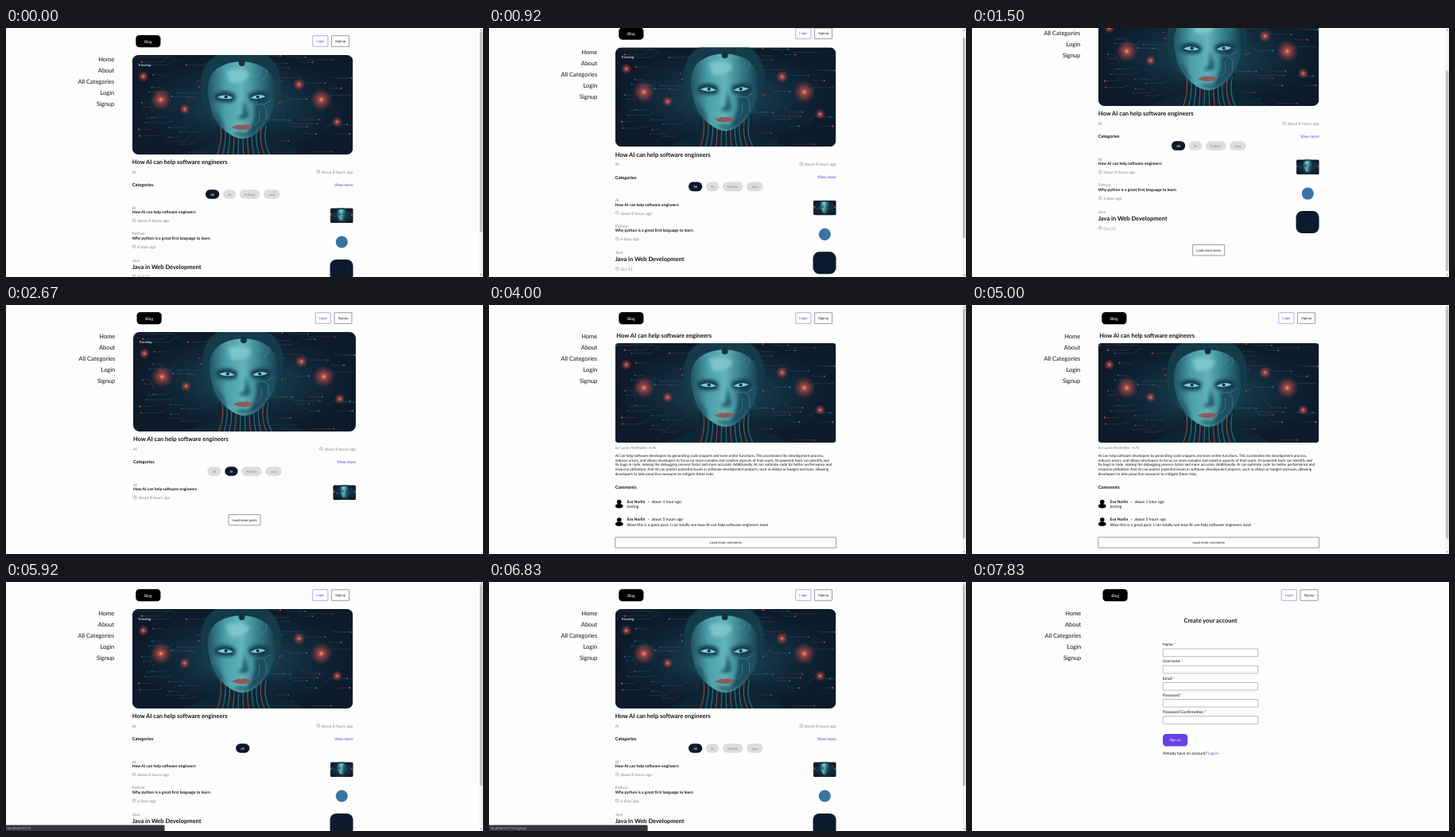
These frames come from a looping animation (600x313 px, 8000 ms). An HTML page:

```html
<!DOCTYPE html>
<html lang="en">
<head>
<meta charset="utf-8">
<title>Blog walkthrough</title>
<style>
  html, body { margin: 0; width: 100%; height: 100%; overflow: hidden; background: #fdfdfd; }
  svg { display: block; width: 100%; height: 100%; }
  text { font-family: Lato, sans-serif; text-rendering: geometricPrecision; white-space: pre; }
  .ui { font-family: "Liberation Sans", Arial, sans-serif; }
  .url { font-family: "Noto Sans", sans-serif; }
</style>
</head>
<body>
<svg viewBox="0 0 600 313">
  <defs>
    <radialGradient id="night"><stop offset="0" stop-color="#1c4c5e"/><stop offset=".55" stop-color="#112b3c"/><stop offset="1" stop-color="#0c1a2a"/></radialGradient>
    <linearGradient id="skin"><stop offset="0" stop-color="#1f5263"/><stop offset=".25" stop-color="#4a9ea8"/><stop offset=".5" stop-color="#62b4ba"/><stop offset=".72" stop-color="#3a8490"/><stop offset="1" stop-color="#173f50"/></linearGradient>
    <radialGradient id="glow"><stop offset="0" stop-color="#ff9a7c"/><stop offset=".25" stop-color="#c9524a" stop-opacity=".75"/><stop offset="1" stop-color="#a03a3a" stop-opacity="0"/></radialGradient>
    <filter id="soft"><feGaussianBlur stdDeviation="2"/></filter>
    <symbol id="art" viewBox="0 0 278 125" preserveAspectRatio="none"></symbol>
  </defs>
  <g id="view"></g>
</svg>
<script>
const VIOLET = '#6541e6', GREY = '#858585', NAVY = '#0f172a';
const $ = s => document.querySelector(s);

// ---- drawing helpers ----
const rect = (x, y, w, h, r = 0, fill = '#000', more = '') =>
  `<rect x="${x}" y="${y}" width="${w}" height="${h}" rx="${r}" fill="${fill}" ${more}/>`;
const text = (x, y, s, { size = 5, fill = '#111', bold, at = 'start', cls = '' } = {}) =>
  `<text x="${x}" y="${y}" font-size="${size}" fill="${fill}" text-anchor="${at}" class="${cls}" font-weight="${bold ? 700 : 400}">${s}</text>`;
const button = (x, y, w, h, s, color = '#222') =>
  rect(x, y, w, h, .4, 'none', `stroke="${color}" stroke-width=".45"`) +
  text(x + w / 2, y + h / 2 + 1.5, s, { size: 4.17, fill: color, at: 'middle', cls: 'ui' });
const clock = (x, y) =>
  `<path d="M${x - 2} ${y}a2 2 0 1 0 4 0a2 2 0 1 0-4 0M${x} ${y - 1.2}v1.3h.9" fill="none" stroke="${GREY}" stroke-width=".5"/>`;
const picture = (x, y, w, h, r, zoom = 1) => {
  const id = `clip${Math.round(y)}`;
  return `<clipPath id="${id}">${rect(x, y, w, h, r)}</clipPath><g clip-path="url(#${id})">
    <use href="#art" x="${x - w * (zoom - 1) / 2}" y="${y}" width="${w * zoom}" height="${h}"/></g>`;
};

// ---- android illustration ----
function art() {
  const rnd = i => { const v = Math.sin(i * 91.7 + 3) * 4375.5; return v - Math.floor(v); };
  let s = rect(0, 0, 278, 125, 0, 'url(#night)');
  for (let i = 0; i < 56; i++) {
    const side = i % 2, d = rnd(i) * 98, y = rnd(i + 70) * 122;
    const x = side ? 278 - d : d, dx = (side ? -1 : 1) * (8 + rnd(i + 140) * 18);
    const color = rnd(i + 210) < .45 ? '#a04a48' : '#2c7c8a';
    s += `<path d="M${x} ${y}h${dx}l${dx / 3} ${(rnd(i + 280) - .5) * 16}" fill="none" stroke="${color}" stroke-width=".5" opacity=".6"/>
      <circle cx="${x}" cy="${y}" r="${.4 + rnd(i + 350) * .9}" fill="${color}"/>`;
  }
  for (const [x, y, r] of [[36, 56, 14], [238, 56, 14], [66, 68, 7], [210, 37, 8], [14, 27, 7], [258, 84, 7]])
    s += `<circle cx="${x}" cy="${y}" r="${r}" fill="url(#glow)"/>`;
  s += `<path d="M62 125Q92 114 106 106L108 78H170L174 106Q196 114 218 125Z" fill="#0e2533"/>`;
  for (let i = 0; i < 11; i++)
    s += `<path d="M${111 + i * 5.8} 88Q${114 + i * 5} 108 ${107 + i * 6.6} 125" fill="none" stroke="${i % 3 ? '#286a78' : '#84433f'}" stroke-width="1.3"/>`;
  return s + `
    <path d="M87 51Q82 5 116-4H158Q192 5 187 51Q184 72 174 82L101 80Q90 70 87 51Z" fill="#153a4a"/>
    <path d="M95 44Q95 10 138 8Q180 10 180 46Q180 74 163 92Q149 106 138 105Q124 104 111 89Q96 71 95 44Z" fill="url(#skin)"/>
    <g filter="url(#soft)">
      <path d="M103 50Q116 41 130 50L129 58Q116 61 105 57ZM146 50Q160 41 173 49L170 58Q158 61 148 57Z" fill="#143b4b"/>
      <path d="M154 62Q168 58 179 52Q177 76 162 92Q150 104 139 104Q158 86 154 62Z" fill="#1c4d5e"/>
      <path d="M104 70Q116 84 117 96Q104 84 100 68Z" fill="#215a6a"/>
      <path d="M141 56L147 77Q140 83 132 79L139 74Z" fill="#215e6e"/>
      <path d="M126 99Q138 94 148 99L138 104Z" fill="#2a6f7c"/>
      <path d="M118 20Q138 14 148 24Q140 38 122 34Z" fill="#7cc6ca"/>
    </g>
    <path d="M107 53Q117 47 127 54Q117 57 107 53ZM149 54Q158 47 168 52Q159 57 149 54Z" fill="#79cfd4"/>
    <circle cx="118" cy="52.5" r="2" fill="#0f3040"/><circle cx="158" cy="52.5" r="2" fill="#0f3040"/>
    <path d="M125 91Q134 86 138 88Q142 86 151 90Q138 98 125 91Z" fill="#8d5a5c"/>
    <path d="M156 62h9l4 6v12M160 69v13l-6 7M166 62l8-5M161 33l8-7v-8M150 25h9l5-6" fill="none" stroke="#4a98a2" stroke-width=".6"/>
    <circle cx="138" cy="10" r="4" fill="#12313f"/>`;
}
$('#art').innerHTML = art();

// ---- page parts; W is the width beside the scrollbar ----
const left = W => W * .26667, right = W => W * .73333;

function frameParts(W) {
  const L = left(W), R = right(W);
  return rect(L + 4.5, 9, 31.2, 15.3, 4.5) +
    text(L + 20.1, 18.5, 'Blog', { fill: '#fff', at: 'middle' }) +
    button(R - 50.8, 9.7, 19.2, 13.6, 'Login', VIOLET) + button(R - 27, 9.7, 22, 13.6, 'Signup') +
    ['Home', 'About', 'All Categories', 'Login', 'Signup'].map((s, i) =>
      text(W * .2288, 42.2 + i * 14, s, { size: 7.5, at: 'end' })).join('');
}

function pill(x, w, s, on) {
  return rect(x, 203.2, w, 11.6, 5.8, '#dddddc') +
    rect(x, 203.2, w, 11.6, 5.8, NAVY, `opacity="${on}"`) +
    text(x + w / 2, 210.5, s, { size: 4.2, fill: on > .4 ? '#fff' : GREY, at: 'middle' });
}

function post(W, y, kind, title, time, size = 5) {
  const L = left(W), drop = size - 5;
  return text(L, y, kind, { fill: GREY }) + text(L, y + 5.8 + drop * 1.2, title, { size, bold: 1 }) +
    clock(L + 2.3, y + 14.4 + drop * 1.5) + text(L + 6.6, y + 16.7 + drop * 1.5, time, { fill: GREY });
}

function home(W, { ai = 0, onlyAI, loaded = true }) {
  const L = left(W), R = right(W), C = W / 2;
  let s = picture(L, 34, R - L, 125, 8) + text(L + 7.5, 48, 'Trending', { size: 4.2, fill: '#fff' }) +
    text(L, 171.2, 'How AI can help software engineers', { size: 7.5, bold: 1 }) +
    text(L, 183, 'AI', { fill: GREY }) + clock(R - 43.8, 180.7) +
    text(R, 183, 'about 8 hours ago', { fill: GREY, at: 'end' }) +
    text(L, 199.3, 'Categories', { size: 5.6, bold: 1 }) + text(R, 199, 'View more', { fill: '#5b30f0', at: 'end' });
  s += loaded
    ? pill(C - 46.7, 17.3, 'All', 1 - ai) + pill(C - 24.7, 16.3, 'AI', ai) +
      pill(C - 3.7, 25.5, 'Python', 0) + pill(C + 26.4, 20.5, 'Java', 0)
    : pill(C - 8.6, 17.3, 'All', 1);
  s += post(W, 227.5, 'AI', 'How AI can help software engineers', 'about 8 hours ago') +
    picture(R - 28.5, 226.2, 28.5, 19, 2, 1.24);
  if (!onlyAI)
    s += post(W, 260.3, 'Python', 'Why python is a great first language to learn', '6 days ago') +
      `<circle cx="${R - 14.2}" cy="269" r="7.6" fill="#3a74a6"/>` +
      post(W, 294, 'Java', 'Java in Web Development', 'Oct 13', 7.5) +
      rect(R - 29, 291, 29, 28, 8, '#0b1a2c');
  return s + button(C - 20, onlyAI ? 263.5 : 333.5, 40, 13.4, 'Load more posts');
}

const article = [
  'AI can help software developers by generating code snippets and even entire functions. This accelerates the development process,',
  'reduces errors, and allows developers to focus on more complex and creative aspects of their work. AI-powered tools can identify and',
  'fix bugs in code, making the debugging process faster and more accurate. Additionally, AI can optimize code for better performance and',
  'resource utilization. And AI can predict potential issues in software development projects, such as delays or budget overruns, allowing',
  'developers to take proactive measures to mitigate these risks.'];

function comment(L, y, time, body) {
  return `<circle cx="${L + 5}" cy="${y - 1.2}" r="2.8"/><ellipse cx="${L + 5}" cy="${y + 3.9}" rx="4.8" ry="2.7"/>` +
    text(L + 14.7, y, 'Eva Norlin', { bold: 1 }) + text(L + 41, y, '·', { bold: 1 }) +
    text(L + 45.7, y, time) + text(L + 14.7, y + 6.3, body, { size: 4.95 });
}

function blogPost(W, comments) {
  const L = left(W), R = right(W);
  let s = text(L + 1.6, 41, 'How AI can help software engineers', { size: 7.5, bold: 1 }) +
    picture(L, 48, R - L, 125, 4) + text(L, 180.6, 'by Lucio Andrades  • AI', { fill: GREY }) +
    article.map((line, i) => text(L, 190.8 + i * 5.7, line, { size: 4.62 })).join('') +
    text(L, 231.2, 'Comments', { size: 5.6, bold: 1 });
  if (comments)
    s += comment(L, 248.8, 'about 1 hour ago', 'testing') +
      comment(L, 271.3, 'about 5 hours ago', 'Wow this is a great post, I can totally see how AI can help software engineers now!') +
      button(L, 292, R - L, 13.2, 'Load more comments');
  return s;
}

function signup() {
  return text(300, 51, 'Create your account', { size: 7.5, bold: 1, at: 'middle' }) +
    ['Name', 'Username', 'Email', 'Password', 'Password Confirmation'].map((s, i) =>
      text(240, 80.3 + i * 21.15, s + ' <tspan fill="#e11">*</tspan>') +
      rect(240.2, 84.1 + i * 21.15, 119.6, 9.6, .6, '#fff', 'stroke="#777" stroke-width=".5"')).join('') +
    rect(240, 191, 31.2, 15.6, 4.5, VIOLET) +
    text(255.6, 200.3, 'Sign up', { size: 4.4, fill: '#fff', at: 'middle' }) +
    text(240, 216.7, `Already have an account? <tspan fill="${VIOLET}">Log in</tspan>`);
}

function scrollbar(scroll, max) {
  const track = 303.6, k = track / (313 + max);
  return rect(595.4, 0, 4.6, 313, 0, '#f3f3f3') + rect(596, 4.7 + scroll * k, 3.4, 313 * k, 0, '#c1c1c1') +
    '<path d="M596.6 3.2h2.4l-1.2-1.5zM596.6 309.8h2.4l-1.2 1.5z" fill="#666"/>';
}

function status(url, alpha) {
  return `<g opacity="${alpha}"><path d="M0 305.6H198q1.6 0 1.6 1.6V313H0Z" fill="#35363a"/>` +
    text(1.5, 311, url, { size: 4.4, fill: '#c4c4c4', cls: 'url' }) + '</g>';
}

// ---- timeline ----
// progress 0..1 in n steps at 12 per second, the first taken at start
const ramp = (t, start, n) => Math.min(1, Math.max(0, (Math.floor((t - start) / 83.33 + .1) + 1) / n));
const ease = p => p < .5 ? 4 * p ** 3 : 1 - 4 * (1 - p) ** 3;
const scrolled = (t, max, down, n, up, m) => max * (ease(ramp(t, down, n)) - ease(ramp(t, up, m)));

function scene(t) {
  let bar = true, scroll = 0, max = 65, draw;
  if (t < 2670) {
    scroll = scrolled(t, max, 920, 3, 1500, 4);
    draw = W => home(W, { ai: ramp(t, 2250, 2) });
  } else if (t < 3670) {
    bar = false;
    draw = W => home(W, { ai: 1, onlyAI: true });
  } else if (t < 5750) {
    bar = t >= 3750;
    max = 16;
    scroll = scrolled(t, max, 4330, 4, 4750, 4);
    draw = W => blogPost(W, bar);
  } else if (t < 6920) {
    draw = W => home(W, { loaded: t >= 6080 });
  } else {
    bar = false;
    draw = signup;
  }
  const W = bar ? 595.3 : 600;
  let s = `<g transform="translate(0 ${-scroll})">${frameParts(W)}${draw(W)}</g>`;
  if (bar) s += scrollbar(scroll, max);
  for (const [url, on, n, off, m] of [['/post/1', 3420, 2, 3750, 4], ['', 5580, 2, 6080, 4], ['/signup', 6750, 2, 7080, 6]]) {
    const alpha = ramp(t, on, n) - ramp(t, off, m);
    if (alpha > 0) s += status('localhost:5173' + url, alpha);
  }
  return s;
}

let shown;
function tick() {
  const s = scene(performance.now() % 8000);
  if (s !== shown) $('#view').innerHTML = shown = s;
  requestAnimationFrame(tick);
}
tick();
</script>
</body>
</html>
```
